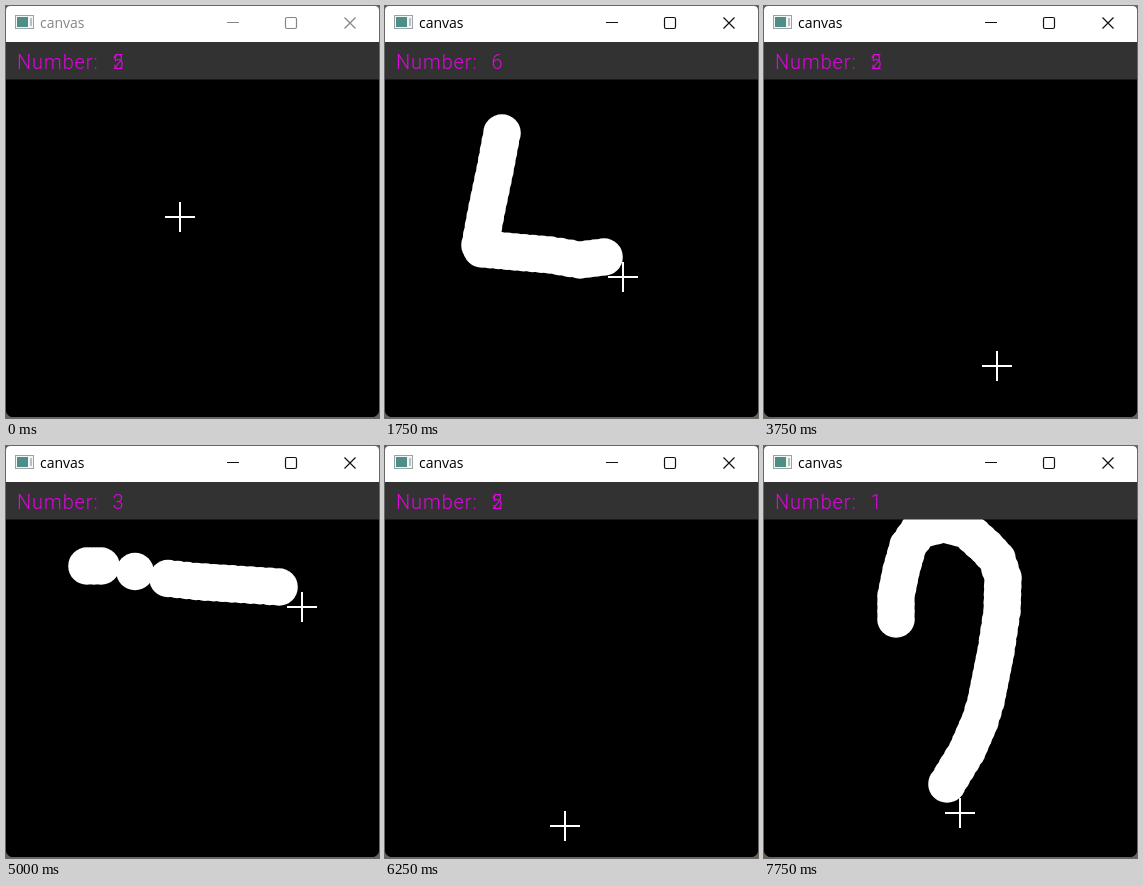
Animation of 373x412 px, one loop 8000 ms. Source, as an HTML page with a canvas:

```html
<!DOCTYPE html>
<html lang="en">
<head>
<meta charset="utf-8">
<title>canvas</title>
<style>
  html, body { margin: 0; width: 100%; height: 100%; overflow: hidden; background: #6d6258; }
  .window { position: absolute; left: 0; top: 0; width: 373px; height: 411px;
    border-radius: 4px 4px 7px 7px; overflow: hidden; background: #000; }
  canvas, svg { position: absolute; left: 0; top: 0; display: block; }
  .caption { font: 14px "Open Sans", "Noto Sans", sans-serif; fill: #000; }
  .controls { fill: none; stroke: #111; stroke-width: 1.2; }
  .inactive .caption { fill: #858585; }
  .inactive .controls { stroke: #858585; }
  .readout { font: 300 20px Roboto, "Open Sans", sans-serif; fill: #dc08dc; }
  .label { letter-spacing: .9px; }
</style>
</head>
<body>
<div class="window">
  <canvas id="pad" width="373" height="412"></canvas>
  <svg id="chrome" class="inactive" width="373" height="412">
    <rect width="373" height="37" fill="#fff"/>
    <rect y="36" width="373" height="37.5" fill="#323232"/>
    <g>
      <rect x="9.5" y="9.5" width="18" height="13" fill="#f4f6f6" stroke="#9ca3a6"/>
      <rect x="11" y="11" width="11" height="10" fill="#4d8f86"/>
      <rect x="24" y="12" width="2" height="8" fill="#b9c0c2"/>
    </g>
    <text class="caption" x="34" y="22">canvas</text>
    <g class="controls">
      <path d="M221 16.5h12M338.5 11.5l11 11m0-11l-11 11"/>
      <rect x="279.5" y="11.5" width="11" height="11" rx="1.5"/>
    </g>
    <g class="readout">
      <text class="label" x="11" y="63">Number:</text>
      <text id="digit" x="106.5" y="63"></text>
      <text id="ghost" x="106.5" y="63"></text>
    </g>
  </svg>
</div>
<script>
const STEP = 250, STEPS = 32, RADIUS = 18.8, SPACING = 9;
const pad = document.getElementById('pad').getContext('2d');
const chrome = document.getElementById('chrome');
const digit = document.getElementById('digit');
const ghost = document.getElementById('ghost');

// Each shape is a list of pen strokes.
const four = [
  [[117, 127], [110, 164], [102, 202], [95, 239]],
  [[97, 243], [130, 246], [165, 249], [195, 254], [219, 251]],
  [[216, 172], [216, 210], [217, 245], [213, 284]]
];
const seven = [
  [[81, 120], [95, 120]],
  [[129, 125.5]],
  [[162, 132.5], [190, 135.5], [235, 138.5], [273, 141]],
  [[268, 146], [205, 225], [112, 325]]
];
const hook = [
  [[132, 173], [132, 150], [137, 125], [144, 100], [155, 84], [180, 78], [203, 84], [222, 101],
   [233, 113], [239, 132], [238, 165], [232, 205], [222, 255], [216, 275], [203, 305], [183, 338]]
];

// Keyed by step; a value holds until the next key.
const ink = {
  0: [four, 0], 2: [four, 1], 3: [four, 2], 4: [four, 3], 5: [four, 4],
  6: [four, 6], 7: [four, 9], 8: [four, 10], 9: [four, 11.5], 10: [four, 13],
  15: [seven, 0], 17: [seven, 1], 18: [seven, 4], 19: [seven, 5.4], 20: [seven, 7],
  21: [seven, 9], 22: [seven, 10], 25: [hook, 0], 27: [hook, 1],
  28: [hook, 5], 29: [hook, 9], 30: [hook, 12.4], 31: [hook, 16]
};
const hover = {
  0: [174, 211], 1: [150, 158], 5: [114, 260], 8: [235, 192], 10: [232, 305],
  11: [224, 340], 12: [228, 366], 13: [233, 360], 16: [150, 225],
  20: [296, 161], 23: [180, 380], 26: [160, 270], 31: [196, 367]
};
const digits = { 0: '', 2: '3', 3: '6', 9: '4', 15: '', 17: '3', 21: '7', 25: '', 27: '3', 28: '1' };

const lastKey = (track, step) => {
  while (!(step in track)) step--;
  return step;
};

function stamp(x, y) {
  pad.beginPath();
  pad.arc(x, y, RADIUS, 0, 7);
  pad.fill();
}

function drawInk(strokes, count) {
  let tip = null;
  for (const stroke of strokes) {
    stroke.forEach(([x, y], i) => {
      const part = Math.min(1, count--);
      if (part <= 0) return;
      const [px, py] = i ? stroke[i - 1] : [x, y];
      const dx = (x - px) * part, dy = (y - py) * part;
      const n = Math.max(1, Math.round(Math.hypot(dx, dy) / SPACING));
      for (let k = 1; k <= n; k++) stamp(px + dx * k / n, py + dy * k / n);
      tip = [px + dx, py + dy];
    });
  }
  return tip;
}

function drawCursor(x, y) {
  pad.globalCompositeOperation = 'difference';
  pad.beginPath();
  pad.rect(x - 15, y - 1, 30, 2);
  pad.rect(x - 1, y - 15, 2, 30);
  pad.fill();
  pad.globalCompositeOperation = 'source-over';
}

function render(step) {
  pad.fillStyle = '#000';
  pad.fillRect(0, 0, 373, 412);
  pad.fillStyle = '#fff';
  const inkKey = lastKey(ink, step), hoverKey = lastKey(hover, step);
  const tip = drawInk(...ink[inkKey]);
  const [x, y] = tip && inkKey > hoverKey ? [tip[0] + 19, tip[1] + 20] : hover[hoverKey];
  drawCursor(Math.round(x), Math.round(y));

  const value = digits[lastKey(digits, step)];
  digit.textContent = value || '2';
  ghost.textContent = value ? '' : '5';
  chrome.classList.toggle('inactive', step === 0);
}

let shown = -1;
function tick() {
  const step = Math.floor(performance.now() / STEP) % STEPS;
  if (step !== shown) render(shown = step);
  requestAnimationFrame(tick);
}
tick();
</script>
</body>
</html>
```
